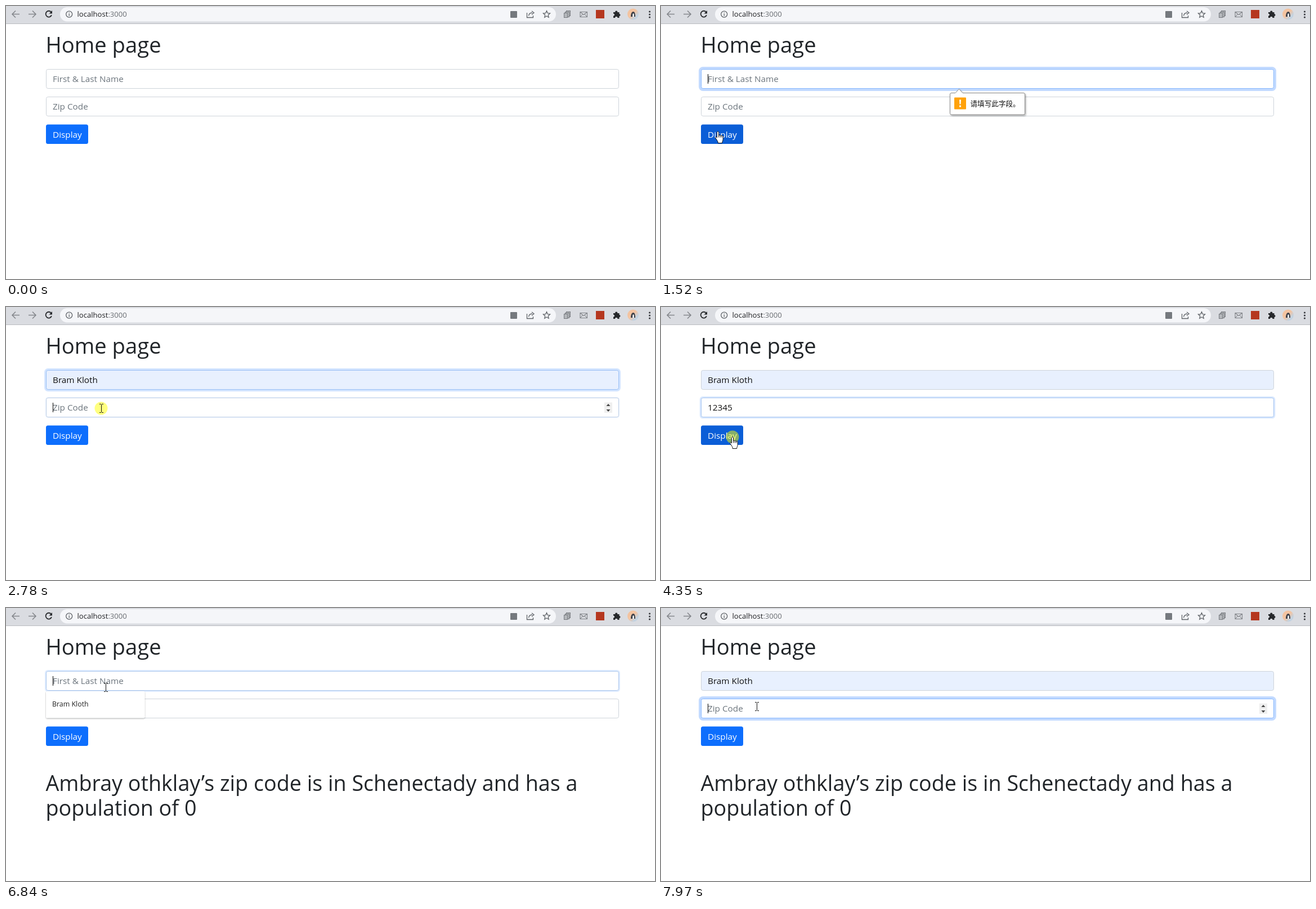
Animation of 1153 by 485 pixels, one loop 8 s. Source, as an HTML page:

```html
<!DOCTYPE html>
<html lang="en">
<head>
<meta charset="utf-8">
<title>Home page</title>
<style>
  html, body { margin: 0; width: 100%; height: 100%; overflow: hidden; background: #fff; }
  svg { display: block; }
  text { font-family: "Open Sans", "Noto Sans", sans-serif; font-size: 15.3px; fill: #212529; white-space: pre; }
  .title { font-size: 38.2px; }
  .result { font-size: 37.7px; }
  .hint { fill: #6c757d; }
  .value { fill: #111; }
  .small { font-size: 12.4px; fill: #222; }
  .url { font-size: 13.1px; fill: #202124; }
  .cjk { font-family: "Noto Sans CJK SC", "Noto Sans CJK", sans-serif; font-size: 12.6px; fill: #111; }
  .icon { fill: none; stroke: #5f6368; stroke-width: 1.3; }
  .dim { stroke: #85888d; stroke-width: 1.6; }
  .ring { fill: #0d6efd; }
  .box { fill: #fff; stroke: #ced4da; }
  .caret { fill: #000; }
</style>
</head>
<body>
<svg width="1153" height="485" viewBox="0 0 1153 485">
  <defs>
    <linearGradient id="face" x1="0" y1="0" x2="1" y2="1">
      <stop offset=".45" stop-color="#f3c3a0"/>
      <stop offset=".75" stop-color="#c3d3e2"/>
    </linearGradient>
    <filter id="soft" x="-10%" y="-20%" width="125%" height="160%">
      <feDropShadow dx="1.5" dy="2" stdDeviation="1.5" flood-opacity=".3"/>
    </filter>
    <filter id="drop" x="-5%" y="-10%" width="110%" height="130%">
      <feDropShadow dx="0" dy="1" stdDeviation="1" flood-opacity=".35"/>
    </filter>
  </defs>

  <!-- browser bar -->
  <rect width="1153" height="31" fill="#dadce1"/>
  <rect y="31" width="1153" height="1" fill="#b9bbc0"/>
  <rect x="96" y="2" width="881" height="25.5" rx="12.7" fill="#f5f6f9"/>
  <path class="icon dim" d="M24 14.5H11.5M17 8.5L11 14.5L17 20.5M40 14.5H52.5M47 8.5L53 14.5L47 20.5"/>
  <path class="icon" style="stroke:#26282b;stroke-width:1.8" d="M80.4 11A5.4 5.4 0 1 0 81 16.2"/>
  <path d="M82 8V13.4H76.6Z" fill="#26282b"/>
  <circle class="icon" cx="112.2" cy="14.6" r="5.5"/>
  <path class="icon" d="M112.2 13.8V17.8M112.2 11.2V12.6"/>
  <text class="url" x="126.5" y="19">localhost<tspan fill="#6a6e73">:3000</tspan></text>
  <rect x="896" y="9" width="12" height="12" rx="1" fill="#75797e"/>
  <path class="icon" d="M925.5 12V20.5H936.5V17M928.5 17.5C929 13.5 931.5 12 935 12M934 9L938 12L934 15.2"/>
  <path class="icon" d="M960.5 8.6L962.2 12.6L966.5 13L963.2 15.9L964.2 20.2L960.5 17.9L956.8 20.2L957.8 15.9L954.5 13L958.8 12.6Z"/>
  <g fill="#b4b7bb" stroke="#777a7f">
    <rect x="995.5" y="8.5" width="7" height="9"/>
    <rect x="993.5" y="10.5" width="7" height="9"/>
    <rect x="991.5" y="12.5" width="6" height="8"/>
  </g>
  <path class="icon" style="stroke:#808388;stroke-width:1.1" d="M1020 10.5H1032.5V19.5H1020ZM1020 10.5L1026.2 15.5L1032.5 10.5M1020 19.5L1024.5 14.5M1032.5 19.5L1028 14.5"/>
  <rect x="1048" y="7" width="15" height="15" fill="#b5371f"/>
  <path fill="#26282b" d="M1079 11H1082.3A2 2 0 1 1 1086.2 11H1089.5V14A2 2 0 1 1 1089.5 18V21H1086.5A2 2 0 0 0 1082 21H1079V17.7A2 2 0 0 0 1079 13.5Z"/>
  <circle cx="1114" cy="14.5" r="10" fill="url(#face)"/>
  <path d="M1110 19C1110 13 1112 10 1114.5 10S1118 14 1118 19Z" fill="#3c4049"/>
  <path d="M1113.2 19C1113 15 1113.5 13 1114.5 13S1116 15 1115.8 19Z" fill="#fff"/>
  <g fill="#3a3c40">
    <circle cx="1143.5" cy="10" r="1.6"/><circle cx="1143.5" cy="15" r="1.6"/><circle cx="1143.5" cy="20" r="1.6"/>
  </g>

  <!-- page -->
  <text class="title" x="70.5" y="83">Home page</text>

  <rect class="ring" id="nameRing"/>
  <rect class="box" id="nameBox" x="71.5" y="112.5" width="1017" height="34" rx="3.2"/>
  <text id="nameText" x="83" y="135"></text>
  <rect class="caret" id="nameCaret" x="83" y="121" width="1" height="17"/>

  <rect class="ring" id="zipRing"/>
  <rect class="box" id="zipBox" x="71.5" y="161.5" width="1017" height="34" rx="3.2"/>
  <text id="zipText" x="83" y="184"></text>
  <rect class="caret" id="zipCaret" y="170" width="1" height="17"/>
  <g id="spin">
    <rect x="1063" y="169.5" width="14" height="18.5" fill="#efefef"/>
    <path d="M1066.5 176L1070 172L1073.500 176ZM1066.5 182L1070 186L1073.5 182Z" fill="#454545"/>
  </g>

  <rect id="button" x="71" y="210.5" width="75" height="34.5" rx="3.5"/>
  <text x="83" y="233.5" style="fill:#fff;font-weight:500">Display</text>

  <g id="result">
    <text class="result" x="70.5" y="325">Ambray othklay’s zip code is in Schenectady and has a</text>
    <text class="result" x="70.5" y="369">population of 0</text>
  </g>

  <g id="tip">
    <path filter="url(#soft)" fill="#fff" stroke="#858585" d="M516 154.500H523L529.500 147.500L536 154.500H644A2.500 2.500 0 0 1 646.500 157V190.500A2.500 2.500 0 0 1 644 193H516A2.500 2.500 0 0 1 513.500 190.500V157A2.500 2.500 0 0 1 516 154.500Z"/>
    <rect x="521" y="162.500" width="21" height="21" rx="1" fill="#ffa20c"/>
    <path d="M530 166.500H533L532.500 174.500H530.500ZM530 176.500H533V179.500H530Z" fill="#fff"/>
    <text class="cjk" x="549.5" y="178">请填写此字段。</text>
  </g>

  <g id="popup">
    <rect x="71" y="148" width="175.500" height="47.500" rx="2" fill="#fff" filter="url(#drop)"/>
    <rect id="item" x="71" y="155.500" width="175.500" height="31" fill="#e8e8ea"/>
    <text class="small" x="82" y="175">Bram Kloth</text>
  </g>

  <!-- pointer -->
  <g id="pointer">
    <circle id="press" r="11.500" fill="#ff0" opacity=".5"/>
    <path id="arrow" fill="#fff" stroke="#111" d="M.5 .5V15.500L4 12.200L6.300 17.500L8.600 16.500L6.300 11.300H10.800Z"/>
    <path id="beam" fill="none" stroke="#111" d="M-3 -7.500H-.5L.5 -6.500L1.500 -7.500H4M.5 -6.500V6.500M-3 7.500H-.5L.5 6.500L1.500 7.500H4"/>
    <g id="hand">
      <path fill="#fff" stroke="#111" d="M0 0C-1 0 -1.600 .7 -1.600 1.700V11L-2.600 9.800C-3.600 8.700 -5 10 -4.200 11.300L-.8 16.600C-.2 17.600 .2 18 .2 20.500H7.600C7.600 18 9.200 16.600 9.200 13.500V8.600C9.200 7 7.200 6.800 6.900 8C6.700 6.300 4.700 6.200 4.300 7.400C4 6 2 5.900 1.600 7V1.700C1.600 .7 1 0 0 0Z"/>
      <path fill="none" stroke="#111" d="M1.600 7V10.500M4.300 7.400V10.500M6.900 8V10.500"/>
    </g>
  </g>
</svg>

<script>
  const LOOP = 8000;
  const NAME = "Bram Kloth", ZIP = "12345";
  const el = {};
  document.querySelectorAll("svg [id]").forEach(e => el[e.id] = e);

  // pointer stops: time, x, y
  const path = [
    [200, 1033, 431], [430, 768, 342], [820, 150, 245], [1000, 101, 223],
    [1600, 101, 223], [1830, 157, 141], [2020, 157, 141], [2220, 140, 171],
    [2400, 140, 171], [2670, 169, 180], [3630, 169, 180], [3850, 178, 236],
    [4150, 127, 231], [4600, 127, 231], [5030, 256, 425], [5180, 307, 445],
    [6100, 307, 445], [6590, 177, 141], [7200, 177, 141], [7380, 165, 171],
    [7560, 165, 171], [7720, 170, 175], [LOOP, 170, 175]
  ];

  const within = (t, ...spans) => spans.some(([a, b]) => t >= a && t < b);
  const inside = (p, x0, y0, x1, y1) => p.x >= x0 && p.x <= x1 && p.y >= y0 && p.y <= y1;
  const show = (e, on) => e.setAttribute("visibility", on ? "visible" : "hidden");

  function ramp(t, start) {
    const x = Math.min(1, Math.max(0, (t - start) / 150));
    return x * x * (3 - 2 * x);
  }

  function pointerAt(t) {
    const i = Math.max(1, path.findIndex(s => s[0] > t));
    const [t0, x0, y0] = path[i - 1], [t1, x1, y1] = path[i];
    const k = Math.max(0, (t - t0) / (t1 - t0));
    return { x: Math.round(x0 + (x1 - x0) * k), y: Math.round(y0 + (y1 - y0) * k) };
  }

  function focus(ring, box, y, k) {
    const grow = 4 * k;
    const attrs = { x: 71 - grow, y: y - grow, width: 1018 + 2 * grow, height: 35 + 2 * grow,
                    rx: 3.5 + grow, opacity: 0.25 * k };
    for (const a in attrs) ring.setAttribute(a, attrs[a]);
    const mix = (a, b) => Math.round(a + (b - a) * k);
    box.style.stroke = `rgb(${mix(206, 134)},${mix(212, 183)},${mix(218, 254)})`;
  }

  function write(node, value, hint) {
    node.textContent = value || hint;
    node.setAttribute("class", value ? "value" : "hint");
  }

  function draw(t) {
    const p = pointerAt(t);
    const popup = within(t, [1930, 2370], [6820, 7530]);
    const overItem = popup && inside(p, 71, 156, 246, 187);
    const overButton = t >= 200 && inside(p, 71, 211, 146, 245);
    const overZip = !popup && inside(p, 71, 161, 1089, 196);
    const overName = inside(p, 71, 112, 1089, 147);
    const result = t >= 4500;
    const overText = result && (inside(p, 71, 290, 1015, 376) || inside(p, 285, 437, 330, 460));

    // fields
    focus(el.nameRing, el.nameBox, 112, ramp(t, 1130) - ramp(t, 2730) + ramp(t, 6765) - ramp(t, 7740));
    focus(el.zipRing, el.zipBox, 161, ramp(t, 2730) - ramp(t, 4285) + ramp(t, 7740));
    const filled = overItem || within(t, [2370, 4500], [7530, LOOP]);
    el.nameBox.style.fill = filled ? "#e8f0fe" : "#fff";
    write(el.nameText, filled ? NAME : "", "First & Last Name");

    const typed = within(t, [3280, 4500]) ? Math.min(5, 1 + Math.floor((t - 3280) / 37.5)) : 0;
    write(el.zipText, ZIP.slice(0, typed), "Zip Code");
    show(el.nameCaret, !filled && within(t, [1130, 1650], [1880, 2370], [6790, 7290]));
    show(el.zipCaret, within(t, [2730, 3630], [7740, LOOP]));
    el.zipCaret.setAttribute("x", 83 + Math.round(8.75 * typed));
    show(el.spin, overZip);

    el.button.style.fill = overButton ? "#0b5ed7" : "#0d6efd";
    show(el.result, result);
    show(el.popup, popup);
    show(el.item, overItem);
    show(el.tip, within(t, [1180, 1900]));
    el.tip.setAttribute("opacity", ramp(t, 1150));

    // pointer
    const on = t >= 200 && !within(t, [3280, 3630]);
    const beam = overName || overZip || overText;
    el.pointer.setAttribute("transform", `translate(${p.x} ${p.y})`);
    show(el.press, on && within(t, [1040, 1160], [1880, 1960], [2320, 2400], [2730, 2880],
      [4270, 4400], [5330, 5540], [6790, 6835], [7480, 7560], [7740, 7880]));
    show(el.hand, on && overButton);
    show(el.beam, on && beam);
    show(el.arrow, on && !overButton && !beam);
  }

  function tick() {
    draw(performance.now() % LOOP);
    requestAnimationFrame(tick);
  }
  tick();
</script>
</body>
</html>
```
